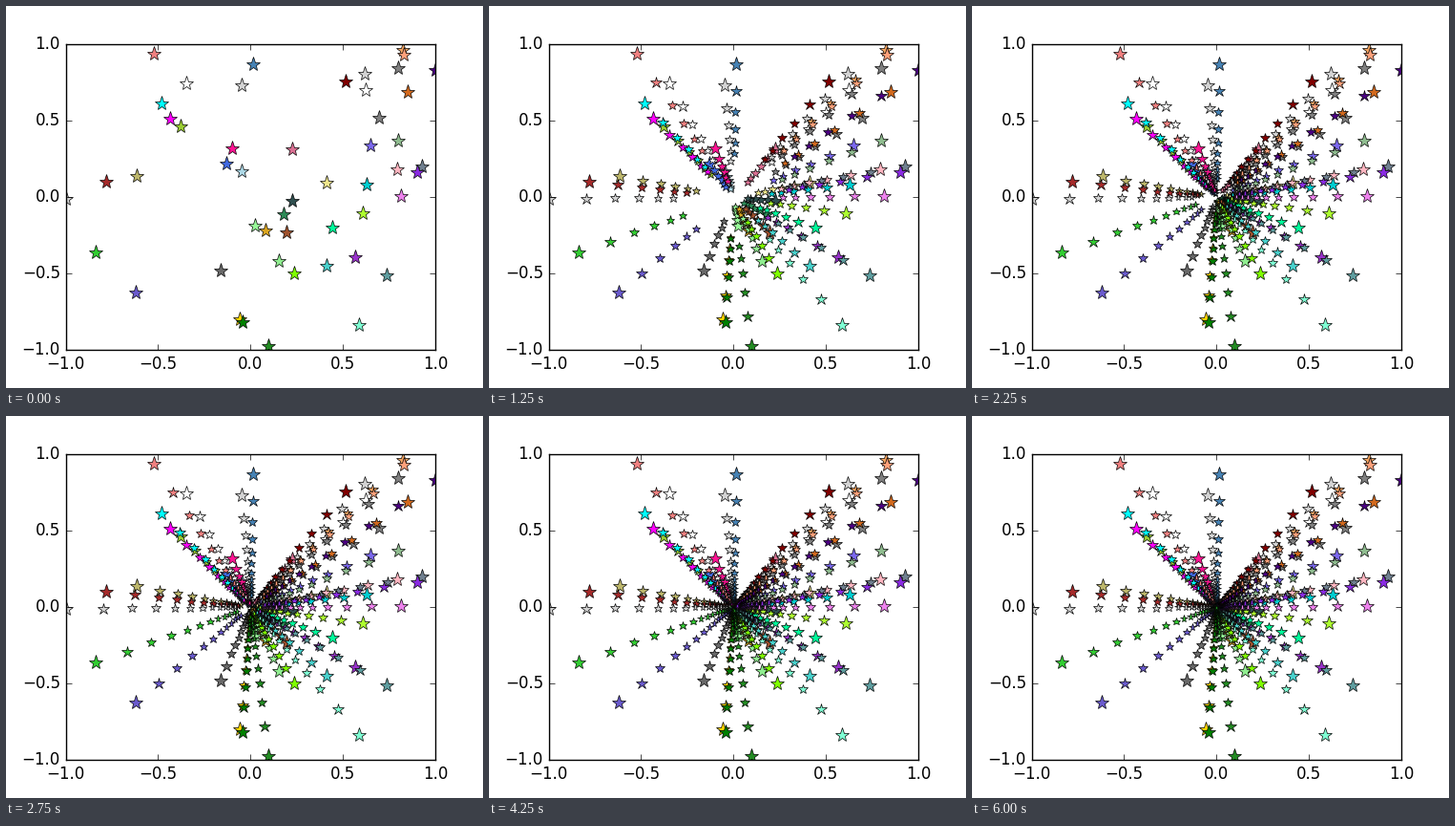
A matplotlib script that plays this animation: 500x400 px, repeating every 6.25 s.

```python
import matplotlib.pyplot as plt
import numpy as np
from matplotlib.animation import FuncAnimation

FRAMES = 25
STEP_MS = 250
PULL = 0.8         # each step moves every star this much closer to the centre
SIZE = 11          # first marker size, in points
SIZE_DECAY = 0.3   # later markers shrink quickly at first, then slowly

STARS = [
    (-0.522, 0.936, "lightcoral"), (-0.345, 0.742, "white"),
    (-0.046, 0.729, "lightgray"), (0.016, 0.868, "steelblue"),
    (0.516, 0.755, "maroon"), (0.620, 0.805, "lightgray"),
    (0.625, 0.698, "white"), (0.801, 0.843, "gray"),
    (0.822, 0.960, "sandybrown"), (0.830, 0.930, "lightsalmon"),
    (0.850, 0.686, "chocolate"), (-0.377, 0.461, "yellowgreen"),
    (-0.481, 0.610, "cyan"), (-0.433, 0.511, "magenta"),
    (0.693, 0.517, "gray"), (0.998, 0.829, "indigo"),
    (0.651, 0.336, "mediumslateblue"), (0.801, 0.367, "darkseagreen"),
    (-0.046, 0.167, "lightblue"), (-0.128, 0.217, "royalblue"),
    (-0.098, 0.316, "deeppink"), (0.228, 0.311, "palevioletred"),
    (-0.613, 0.135, "darkkhaki"), (-0.780, 0.099, "brown"),
    (0.413, 0.092, "khaki"), (0.630, 0.079, "darkturquoise"),
    (0.791, 0.180, "lightpink"), (0.929, 0.202, "slategray"),
    (-0.998, -0.013, "lightgray"), (0.228, -0.026, "darkslategray"),
    (0.177, -0.113, "seagreen"), (0.027, -0.188, "palegreen"),
    (0.083, -0.221, "goldenrod"), (0.196, -0.233, "sienna"),
    (0.440, -0.202, "mediumspringgreen"), (0.610, -0.107, "greenyellow"),
    (0.156, -0.419, "lightgreen"), (0.238, -0.502, "chartreuse"),
    (0.413, -0.452, "mediumturquoise"), (0.568, -0.396, "darkorchid"),
    (0.738, -0.514, "cadetblue"), (0.589, -0.839, "aquamarine"),
    (0.816, 0.004, "violet"), (0.904, 0.161, "blueviolet"),
    (-0.837, -0.364, "limegreen"), (-0.620, -0.627, "slateblue"),
    (-0.160, -0.483, "dimgray"), (-0.056, -0.802, "gold"),
    (-0.045, -0.821, "green"), (0.098, -0.977, "forestgreen"),
]

plt.style.use("classic")
plt.rcParams["font.family"] = "DejaVu Sans"

fig = plt.figure(figsize=(5, 4), dpi=100, facecolor="white")
ax = fig.add_axes([0.125, 0.1, 0.775, 0.8])
ax.set(xlim=(-1, 1), ylim=(-1, 1), autoscale_on=False)
ticks = np.linspace(-1, 1, 5)
ax.set_xticks(ticks)
ax.set_yticks(ticks)


def add_layer(step):
    k = PULL ** step
    size = SIZE * (step + 1) ** -SIZE_DECAY
    return [ax.plot([x * k], [y * k], "*", color=color, markersize=size,
                    markeredgecolor="black", markeredgewidth=0.5)[0]
            for x, y, color in STARS]


layers = [add_layer(step) for step in range(FRAMES)]


def update(frame):
    for step, layer in enumerate(layers):
        for star in layer:
            star.set_visible(step <= frame)
    return [star for layer in layers for star in layer]


anim = FuncAnimation(fig, update, frames=FRAMES, init_func=lambda: update(0),
                     interval=STEP_MS, repeat=True, repeat_delay=0)
plt.show()
```
